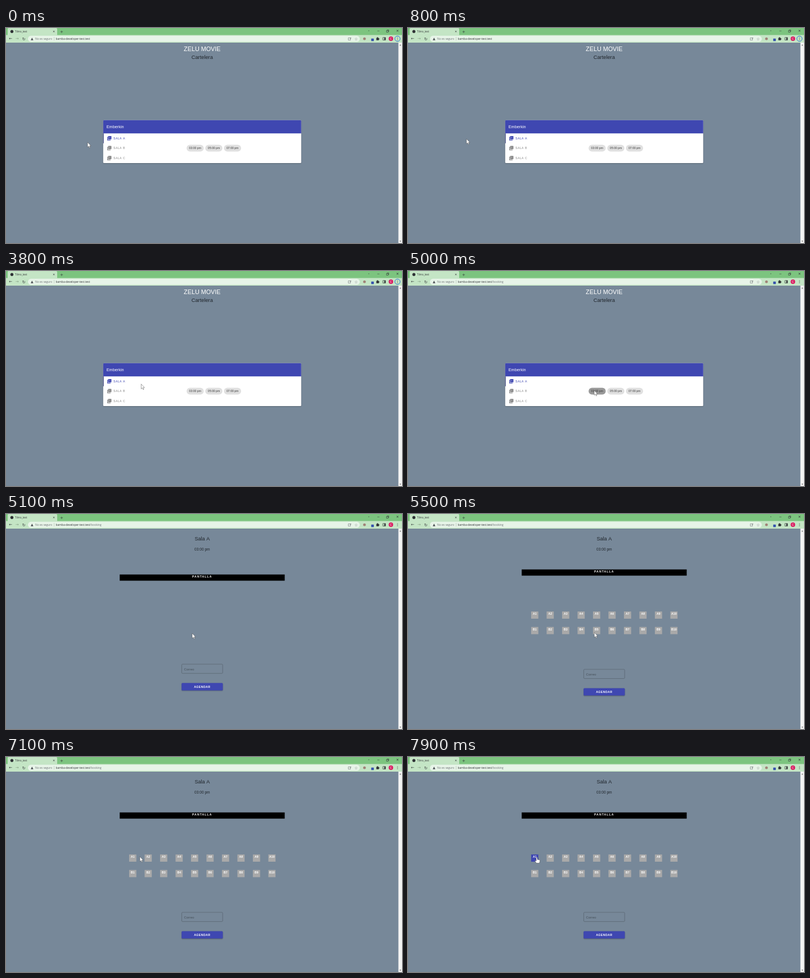
Recreate the animation shown at these times as an HTML page with a canvas. Size 704 px wide and 382 px high, loop 8 s.

```html
<!DOCTYPE html>
<html lang="es">
<head>
<meta charset="utf-8">
<title>Cartelera</title>
<style>
html, body { margin: 0; width: 100%; height: 100%; overflow: hidden; background: #778899; }
canvas { display: block; width: 704px; height: 382px; }
</style>
</head>
<body>
<canvas id="stage"></canvas>
<script>
const W = 704, H = 382, LOOP = 8000, STEP = 100;
const MID = 348.8;          // centre of the page area
const REM = 16 * W / 1920;  // the page is a scaled-down full HD window
const SANS = '"Liberation Sans", Arial, sans-serif';
const UI = '"Open Sans", "Noto Sans", sans-serif';
const SYMBOL = '"DejaVu Sans", sans-serif';
const INDIGO = '#3f47b1', INK = '#20262c', DARK = '#303336', GREY = '#6a6f73', BAR = '#c4e5c5';
const SEAT = 0.8 * 16, GAP = 27.5, SEAT_X = 225.3, SEAT_Y = 179.6;

const canvas = document.getElementById('stage');
const ratio = window.devicePixelRatio || 1;
canvas.width = W * ratio;
canvas.height = H * ratio;
const ctx = canvas.getContext('2d');
ctx.scale(ratio, ratio);

// Pointer moves: start, end, target x, target y
const MOVES = [
  [200, 600, 408, 207], [600, 800, 104, 197],
  [1900, 2600, 219.7, 136.7], [2600, 3100, 214, 118], [3100, 3800, 240.3, 200.8],
  [3900, 4800, 331, 212], [5400, 6200, 335.5, 178],
  [6300, 7200, 234.5, 177], [7200, 7500, 229, 178]
];

const ease = k => k * k * (3 - 2 * k);

function pointerAt(t) {
  let x = 145, y = 203;
  for (const [from, to, tx, ty] of MOVES) {
    const k = ease(Math.min(1, Math.max(0, (t - from) / (to - from))));
    x += (tx - x) * k;
    y += (ty - y) * k;
  }
  return { x, y };
}

function rect(x, y, w, h, fill, r = 0) {
  ctx.fillStyle = fill;
  ctx.beginPath();
  ctx.roundRect(x, y, w, h, r);
  ctx.fill();
}

function frame(x, y, w, h, color, width = 0.7, r = 0) {
  ctx.strokeStyle = color;
  ctx.lineWidth = width;
  ctx.beginPath();
  ctx.roundRect(x, y, w, h, r);
  ctx.stroke();
}

function disc(x, y, r, fill) {
  rect(x - r, y - r, 2 * r, 2 * r, fill, r);
}

function text(str, x, y, size, color, { font = SANS, align = 'left', weight = 400, gap = 0 } = {}) {
  ctx.font = `${weight} ${size}px ${font}`;
  ctx.textAlign = align;
  ctx.letterSpacing = gap + 'px';
  ctx.fillStyle = color;
  ctx.fillText(str, x, y);
}

function centred(str, y, size, color, style) {
  text(str, MID, y, size, color, { align: 'center', ...style });
}

// A symbol whose visible shape is centred on x, y
function symbol(char, x, y, size, color = DARK) {
  ctx.font = `${size}px ${SYMBOL}`;
  ctx.letterSpacing = '0px';
  const m = ctx.measureText(char);
  const base = y + (m.actualBoundingBoxAscent - m.actualBoundingBoxDescent) / 2;
  text(char, x, base, size, color, { font: SYMBOL, align: 'center' });
}

function raised(x, y, w, h, fill) {
  ctx.save();
  ctx.shadowColor = 'rgba(0,0,0,.3)';
  ctx.shadowBlur = 1.5 * ratio;
  ctx.shadowOffsetY = 0.8 * ratio;
  rect(x, y, w, h, fill, 1.5);
  ctx.restore();
}

function drawTabs() {
  rect(0, 0, W, 14, '#7cc47f');
  rect(3, 0, 88, 14, BAR, [2, 2, 0, 0]);
  disc(10.5, 6.2, 2.7, DARK);
  text('Tilmo_test', 16, 8, 4.5, DARK, { font: UI });
  symbol('✕', 85, 6.2, 5);
  symbol('+', 99, 6.2, 7);
  symbol('˅', 645, 5.2, 6);
  symbol('−', 662, 5.3, 6);
  frame(677.5, 3.4, 3, 3, DARK, 0.6);
  rect(676, 4.2, 3.6, 3.6, '#7cc47f');
  frame(676.4, 4.5, 3, 3, DARK, 0.6);
  symbol('✕', 696, 5.2, 6);
}

function drawToolbar(t) {
  rect(0, 12.5, W, 13.5, BAR);
  symbol('←', 8.2, 19, 7);
  symbol('→', 19.6, 19, 7, '#7f9a81');
  symbol('↻', 31.6, 19, 7);

  rect(39, 13.8, 590, 10.8, '#e7f4e8', 5.4);
  symbol('▲', 46.2, 19, 6, '#4a4f53');
  text('No es seguro', 52, 21, 4.95, GREY, { font: UI });
  rect(85, 16, 0.6, 6, '#a9b8aa');
  const host = 'bamba-developer-test.test';
  text(host, 88.5, 21, 4.95, DARK, { font: UI });
  if (t >= 5000) text('/booking', 88.5 + ctx.measureText(host).width, 21, 4.95, GREY, { font: UI });

  frame(608.5, 17.5, 4, 4, GREY, 0.6);
  symbol('↗', 612, 18, 5, GREY);
  symbol('☆', 622.5, 19, 7, GREY);
  disc(637.3, 19.2, 2.4, '#a08377');
  rect(649.3, 18.7, 4.6, 4.6, '#3552ad', 0.6);
  rect(658.4, 17.4, 4.4, 4.4, DARK, 0.5);
  disc(660.5, 17.2, 1, DARK);
  disc(662.9, 19.6, 1, DARK);
  frame(670, 16.9, 4.7, 4.5, DARK);
  rect(672.5, 16.9, 2.2, 4.5, DARK);
  disc(684.3, 19.1, 4, '#d81b60');
  text('C', 684.3, 21, 5, '#fff', { align: 'center' });
  if (t < 4800) frame(691.3, 14.3, 9.4, 9.4, '#2a70cf', 1, 4.7);
  for (let i = -1; i <= 1; i++) disc(696, 19 + 2 * i, 0.55, DARK);
}

function drawScrollbar() {
  rect(697.6, 26, W - 697.6, H - 26, '#f3f3f3');
  symbol('▲', 701, 29.5, 3.4, '#707070');
  symbol('▼', 701, 379, 3.4, '#707070');
}

function drawRoom(name, y, color) {
  rect(180, y - 2.6, 6, 6.4, color, 0.5);
  rect(181.1, y - 4.2, 6.6, 6.8, '#fff');
  rect(181.6, y - 4, 5.8, 5.8, color, 0.5);
  rect(183.4, y - 2.4, 1.8, 2, 'rgba(255,255,255,.35)');
  text(name, 191, y + 1.9, 0.875 * REM, color, { gap: 0.08 * REM });
}

function drawListing(t, p) {
  centred('ZELU MOVIE', 40.5, 10.8, '#fff');
  centred('Cartelera', 55, 9.25, INK);

  const w = 60 * REM, x = MID - w / 2, top = 163.7, head = 4 * REM, row = 3 * REM;
  raised(x, top, w, head + 3 * row, '#fff');
  rect(x, top, w, head, INDIGO, [1.5, 1.5, 0, 0]);
  text('Emberkin', x + REM, 178.2, 1.25 * REM, '#fff');
  rect(x, top + head, 0.9, row, '#232a72');
  ['A', 'B', 'C'].forEach((id, i) => {
    drawRoom('SALA ' + id, top + head + (i + 0.5) * row, i ? '#858585' : INDIGO);
  });

  for (let i = 0; i < 3; i++) {
    const left = 321.1 + i * 33.2, cy = top + head + 1.5 * row;
    const over = t >= 4000 && Math.abs(p.x - left - 15.2) < 15.2 && Math.abs(p.y - cy) < 6;
    rect(left, cy - 6, 30.4, 12, !over ? '#e0e0e0' : t < 4800 ? '#cecece' : '#999', 6);
    text(`0${3 + 2 * i}:00 pm`, left + 15.2, cy + 1.8, 0.875 * REM, '#3a3a3a', { align: 'center' });
  }
}

function drawSeats(t) {
  for (let i = 0; i < 20; i++) {
    const row = Math.floor(i / 10), col = i % 10;
    const x = SEAT_X + col * GAP, y = SEAT_Y + row * GAP;
    const chosen = i === 0 && t >= 7700;
    rect(x - SEAT / 2, y - SEAT / 2, SEAT, SEAT, chosen ? INDIGO : '#a9a9a9');
    text('AB'[row] + (col + 1), x, y - 0.6, 5.1, '#fff', { align: 'center', weight: 700, gap: 0.1 });
  }
}

function drawBooking(t) {
  const loaded = t >= 5200, shift = loaded ? 9.2 : 0;
  centred('Sala A', 46.7, 9.1, INK);
  centred('03:00 pm', 65, 6.6, INK);
  rect(MID - 25 * REM, 107.6 - shift, 50 * REM, 11, '#000');
  centred('PANTALLA', 113.2 - shift, 0.875 * REM, '#fff', { weight: 700, gap: 1.1 });
  if (loaded) drawSeats(t);

  const w = 12.5 * REM, x = MID - w / 2;
  frame(x + 0.3, 266.8 + shift, w - 0.6, 16.4, '#56626e', 0.7, 1.4);
  text('Correo', 316.6, 277.6 + shift, REM, '#465059');
  raised(x, 300.2 + shift, w, 13.2, INDIGO);
  centred('AGENDAR', 308.7 + shift, 0.875 * REM, '#fff', { weight: 700, gap: 0.08 * REM });
}

const ARROW = new Path2D('M0 0V8.7L2 6.9L3.5 10L4.8 9.4L3.5 6.4H6Z');
const HAND = new Path2D('M-1 .8Q0-.6 1 .8V4L4.6 4.8Q5.8 5.2 5.6 6.6L4.6 10.6H-.6L-3.2 7Q-3.4 5.6-2 6L-1 6.8Z');

function drawPointer(t, { x, y }) {
  const dx = (x - SEAT_X) - GAP * Math.round((x - SEAT_X) / GAP);
  const onSeat = t >= 5200 && Math.max(Math.abs(dx), Math.abs(y - SEAT_Y)) < SEAT / 2;
  const shape = onSeat ? HAND : ARROW;
  ctx.save();
  ctx.translate(x, y);
  ctx.lineJoin = 'round';
  ctx.fillStyle = '#fff';
  ctx.strokeStyle = '#444';
  ctx.lineWidth = 0.5;
  ctx.fill(shape);
  ctx.stroke(shape);
  ctx.restore();
}

function draw(t) {
  const pointer = pointerAt(t);
  rect(0, 0, W, H, '#778899');
  drawTabs();
  drawToolbar(t);
  if (t < 5100) drawListing(t, pointer);
  else drawBooking(t);
  drawScrollbar();
  drawPointer(t, pointer);
}

const start = performance.now();
function tick() {
  const t = (performance.now() - start) % LOOP;
  draw(Math.floor(t / STEP) * STEP);
  requestAnimationFrame(tick);
}
tick();
</script>
</body>
</html>
```
